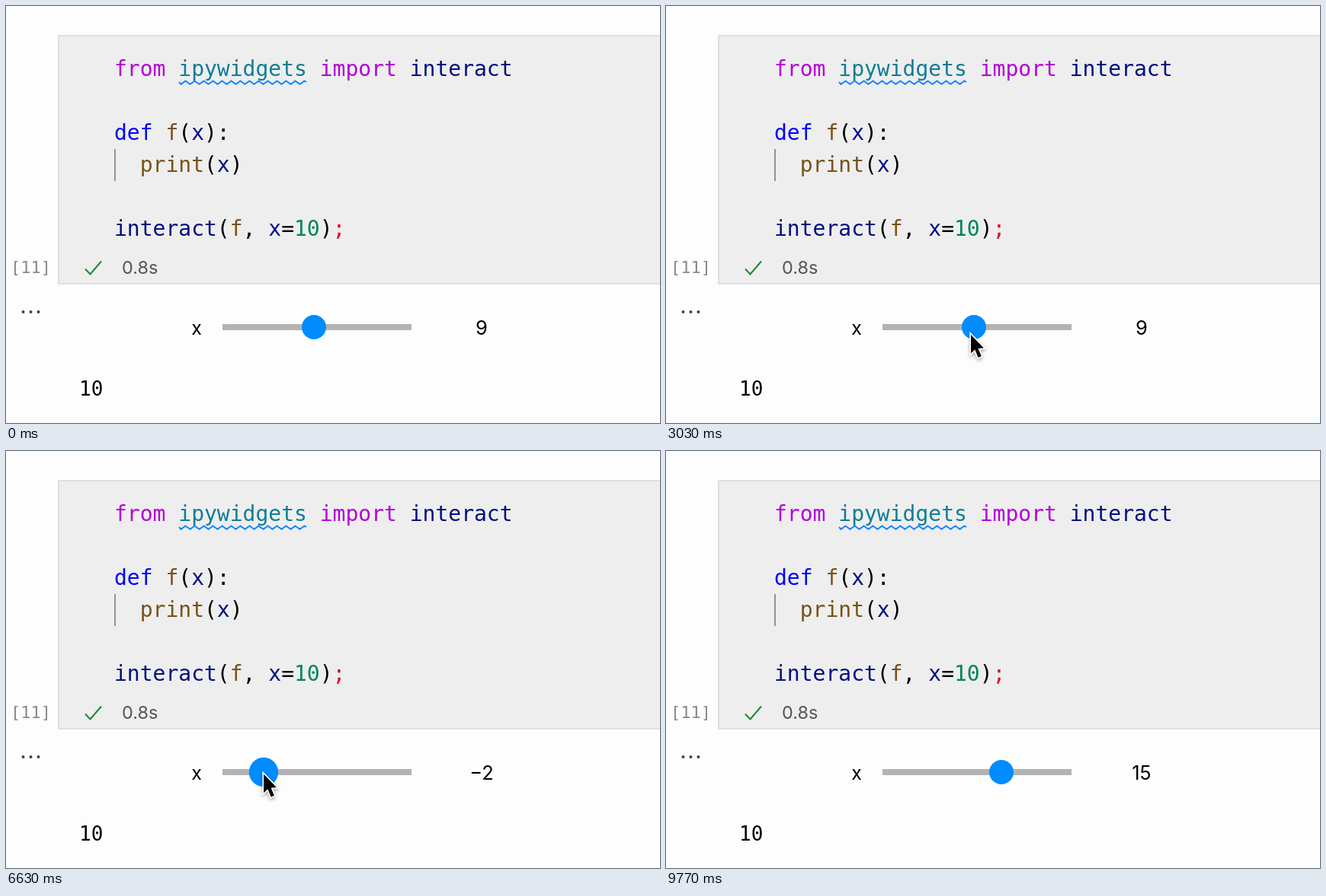
Write an HTML page that moves like this. It is 858 px wide and 548 px high and loops after 9810 ms.

```html
<!DOCTYPE html>
<html lang="en">
<head>
<meta charset="utf-8">
<title>Slider widget</title>
<style>
html, body { margin: 0; width: 100%; height: 100%; overflow: hidden; background: #fdfdfd; }
svg { display: block; }
.mono { font-family: "DejaVu Sans Mono", monospace; }
.sans { font-family: Inter, sans-serif; }
.line { fill: none; }
#arrow { filter: drop-shadow(0 2px 2px rgba(0, 0, 0, .35)); }
</style>
</head>
<body>
<svg width="858" height="548" viewBox="0 0 858 548">
  <rect width="858" height="548" fill="#fdfdfd"/>
  <rect x="69" y="39" width="800" height="326" fill="#eee" stroke="#e0e0e0" stroke-width="2"/>

  <g id="code" class="mono" font-size="28"></g>
  <path id="wave" class="line" stroke="#1a85ff" stroke-width="2"/>
  <path d="M143 188V230" stroke="#949494" stroke-width="2"/>

  <g id="run" class="line" stroke="#424242" stroke-width="2" stroke-linejoin="round">
    <path d="M10 49.5V72.5L28 61Z"/>
    <path d="M44 57.5L51 64.5L58 57.5" stroke-width="1.7"/>
  </g>

  <text class="mono" x="6" y="351" font-size="22" fill="#8a8a8a">[11]</text>
  <path class="line" d="M104 345.5L110.5 352.5L125 335.5" stroke="#168a34" stroke-width="2"/>
  <text class="sans" x="152" y="352" font-size="23.5" fill="#555">0.8s</text>
  <g fill="#444"><circle cx="22.5" cy="402" r="2"/><circle cx="32.5" cy="402" r="2"/><circle cx="42.5" cy="402" r="2"/></g>

  <text class="sans" x="257" y="432" font-size="25" text-anchor="end">x</text>
  <rect x="284" y="418" width="248" height="8" fill="#b3b3b3"/>
  <circle id="knob" cy="422" fill="#008cff"/>
  <text id="value" class="sans" x="624" y="432" font-size="25.5" text-anchor="middle"></text>
  <text class="mono" x="96" y="512" font-size="26">10</text>

  <path id="arrow" d="M0 0V24.5L5.3 19.5L9.6 30L13.8 28.2L9.5 18L16.8 17.4Z" stroke="#fff" stroke-width="3.4" paint-order="stroke"/>
  <g id="beam" class="line">
    <path id="beamEdge" stroke="#fff" stroke-width="5"/>
    <path id="beamCore" stroke="#000" stroke-width="2.4"/>
  </g>
</svg>
<script>
const LOOP = 9810, PRESS = 3250, RELEASE = 8430;
const $ = id => document.getElementById(id);

const colors = { key: '#b400d8', mod: '#0f7d96', name: '#001080', def: '#0000ff',
  fn: '#795218', num: '#008557', semi: '#dc1020', text: '#000' };

// row, column, colour, text
const tokens = [
  [0, 0, 'key', 'from'], [0, 5, 'mod', 'ipywidgets'], [0, 16, 'key', 'import'], [0, 23, 'name', 'interact'],
  [2, 0, 'def', 'def'], [2, 4, 'fn', 'f'], [2, 5, 'text', '('], [2, 6, 'name', 'x'], [2, 7, 'text', '):'],
  [3, 2, 'fn', 'print'], [3, 7, 'text', '('], [3, 8, 'name', 'x'], [3, 9, 'text', ')'],
  [5, 0, 'name', 'interact'], [5, 8, 'text', '('], [5, 9, 'fn', 'f'], [5, 10, 'text', ','],
  [5, 12, 'name', 'x'], [5, 13, 'text', '='], [5, 14, 'num', '10'], [5, 16, 'text', ')'], [5, 17, 'semi', ';']
];
$('code').innerHTML = tokens.map(([row, col, color, text]) =>
  `<text x="${142 + col * 16.857}" y="${92 + row * 42}" fill="${colors[color]}">${text}</text>`).join('');

let wave = 'M227 100';
for (let i = 0; i < 28; i++) wave += `L${229.5 + i * 6} ${i % 2 ? 98.5 : 102.8}`;
$('wave').setAttribute('d', wave + 'L394 100');

const beam = 'M-7 -15Q-1 -15 0 -11Q1 -15 7 -15M0 -11V12M-7 16Q-1 16 0 12Q1 16 7 16M-4 7H4';
$('beamEdge').setAttribute('d', beam);
$('beamCore').setAttribute('d', beam);

// pointer path: time, x, y
const path = [
  [480, 870, 128], [800, 600, 152], [1100, 530, 160], [1500, 519, 161], [2200, 519, 161],
  [2750, 425, 380], [3030, 400, 432], [3250, 407, 424], [3400, 407, 422],
  [4230, 463.3, 419], [4700, 490, 418], [5830, 404.4, 421], [6900, 330, 426], [7300, 330, 428],
  [7900, 360, 428.5], [8350, 443, 424], [8450, 443, 424], [8600, 500, 330], [8800, 720, 180], [8900, 880, 130]
];

const slope = (i, k) => (path[i + 1][k] - path[i][k]) / (path[i + 1][0] - path[i][0]);

function tangent(i, k) {
  if (i === 0) return slope(0, k);
  if (i === path.length - 1) return slope(i - 1, k);
  const a = slope(i - 1, k), b = slope(i, k);
  return a * b > 0 ? 2 * a * b / (a + b) : 0;
}

// monotone cubic between path points
function at(t, k) {
  let i = 0;
  while (i < path.length - 2 && t > path[i + 1][0]) i++;
  const h = path[i + 1][0] - path[i][0];
  const u = Math.min(1, Math.max(0, (t - path[i][0]) / h)), v = 1 - u;
  return path[i][k] * v * v * (1 + 2 * u) + path[i + 1][k] * u * u * (3 - 2 * u)
    + h * u * v * (tangent(i, k) * v - tangent(i + 1, k) * u);
}

const show = (el, on) => el.setAttribute('visibility', on ? 'visible' : 'hidden');

function sliderValue(t) {
  if (t < PRESS) return 9;
  if (t >= RELEASE) return 15;
  return Math.round((at(t, 1) - 352.8) / 6);
}

function draw(t) {
  const x = at(t, 1), y = at(t, 2);
  const visible = t >= path[0][0] && t <= path[path.length - 1][0];
  const inCell = visible && y > 38 && y < 366;
  const overText = inCell && y > 45 && y < 320;
  const value = sliderValue(t);

  $('knob').setAttribute('cx', 350 + value * 6);
  $('knob').setAttribute('r', t >= PRESS && t < RELEASE ? 19.2 : 16);
  $('value').textContent = String(value).replace('-', '\u2212');
  show($('run'), inCell);
  show($('beam'), overText);
  show($('arrow'), visible && !overText);
  for (const id of ['beam', 'arrow']) $(id).setAttribute('transform', `translate(${x} ${y})`);
}

const start = performance.now();
function tick() {
  const t = (performance.now() - start) % LOOP;
  // thirty pictures a second
  draw(Math.round(Math.floor((t + 5) * 0.03) * 10 / 3) * 10);
  requestAnimationFrame(tick);
}
draw(0);
requestAnimationFrame(tick);
</script>
</body>
</html>
```
